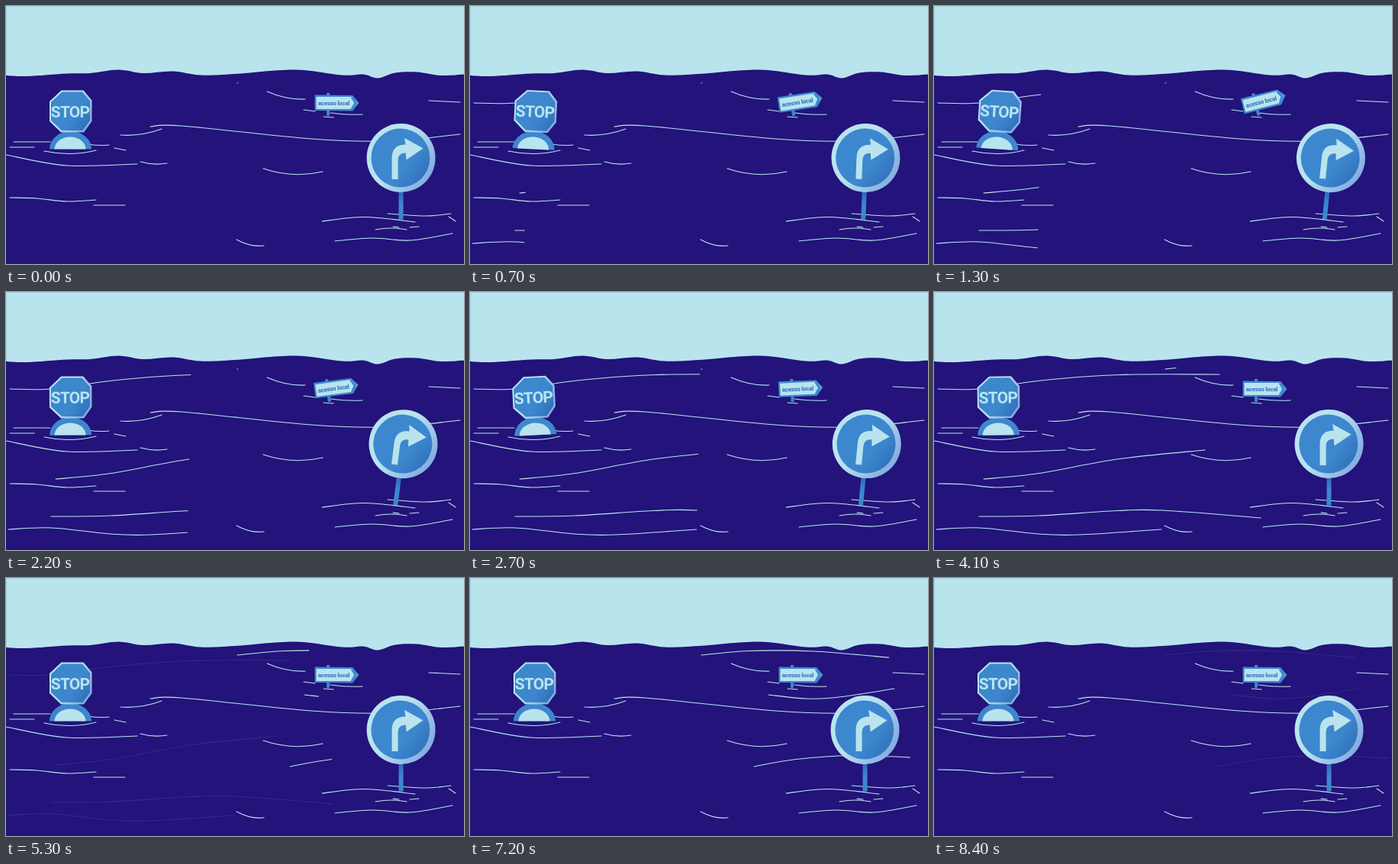
Animation of 600 by 338 pixels, one loop 8800 ms. Source, as an HTML page:

```html
<!DOCTYPE html>
<html lang="pt">
<head>
<meta charset="utf-8">
<title>Signs at sea</title>
<style>
  html, body { margin: 0; width: 100%; height: 100%; overflow: hidden; background: #23137a; }
  svg { display: block; width: 100%; height: 100%; }
  .wave path { fill: none; stroke: #b9e4ee; stroke-width: 1.1; stroke-linecap: round; }
  .pale { fill: #b9e4ee; }
  .blue { fill: #3d87cf; }
  .sea { fill: #23137a; }
  text { font-family: Roboto, "Liberation Sans", sans-serif; font-weight: 700; text-anchor: middle; }
  .stop { font-size: 21px; letter-spacing: -.8px; }
  .local { font-size: 8px; letter-spacing: -.3px; fill: #2f70bd; }
</style>
</head>
<body>
<svg viewBox="0 0 600 338" preserveAspectRatio="none">
  <defs>
    <linearGradient id="rim" x1="0" y1="0" x2="1" y2=".6">
      <stop offset=".5" stop-color="#b9e4ee"/>
      <stop offset="1" stop-color="#86aee2"/>
    </linearGradient>
    <linearGradient id="face" x1="0" y1="0" x2="1" y2=".7">
      <stop offset=".7" stop-color="#3d87cf"/>
      <stop offset="1" stop-color="#3373bd"/>
    </linearGradient>
    <linearGradient id="pole" x1="0" y1="0" x2="0" y2="1">
      <stop offset="0" stop-color="#2d62b0"/>
      <stop offset=".5" stop-color="#3d87cf"/>
    </linearGradient>
    <clipPath id="clipLeft"><polygon id="wipeLeft"/></clipPath>
    <clipPath id="clipRight"><polygon id="wipeRight"/></clipPath>
  </defs>

  <rect class="pale" width="600" height="338"/>
  <path d="M0 .5H600M.5 0V91" stroke="#a3cbd9"/>
  <path id="sea" class="sea"/>
  <g id="swell" class="wave"></g>
  <g id="ripples" class="wave"></g>
  <g id="left" class="wave" clip-path="url(#clipLeft)"></g>
  <g id="right" class="wave" clip-path="url(#clipRight)"></g>

  <g id="stopSign">
    <path class="blue" d="M57 187.5a27.500 23.500 0 0 1 55 0Z"/>
    <path class="pale" d="M63.500 187.500a20.500 16 0 0 1 41 0Z"/>
    <polygon fill="url(#rim)" points="72.500,110.500 101.500,110.500 112.500,123.500 112.500,151 102,165.500 72,165.500 57,151 57,125"/>
    <polygon fill="url(#face)" points="73.500,112.500 100,112.500 110,124.500 110,150 100.500,163 73,163 59,150 59,126"/>
    <text class="stop pale" x="84.100" y="145.700">STOP</text>
  </g>

  <g id="localSign">
    <rect class="blue" x="420" y="114" width="4" height="30"/>
    <path class="blue" d="M404.500 116.500L454 117L462.500 127L454 137.500L404.500 137Z"/>
    <path class="pale" d="M406.500 119H453.500L460.500 127L453.500 135H406.500Z"/>
    <path class="blue" d="M451.500 119.500h3l5.500 7.500l-5.500 8h-3l4.500 -8Z"/>
    <text class="local" x="429.400" y="130.200">acesso local</text>
  </g>

  <g id="turnSign">
    <rect fill="url(#pole)" x="514.500" y="240" width="6" height="39.500"/>
    <circle fill="url(#rim)" cx="517.500" cy="199" r="45"/>
    <circle fill="url(#face)" cx="516.800" cy="199" r="38.500"/>
    <path class="pale" d="M505.500 227V199Q505.500 181.500 523.500 181.500L522 173L546.500 186.500L524.500 201.500L523.500 192.500Q513.500 192.500 513.500 202V227Z"/>
  </g>
</svg>

<script>
const LOOP = 8800, STEP = 100;
const el = id => document.getElementById(id);

// Smooth curve through a flat list x, y, x, y, ...
function curve(flat) {
  const pts = [];
  for (let i = 0; i < flat.length; i += 2) pts.push([flat[i], flat[i + 1]]);
  let d = `M${pts[0]}`;
  for (let i = 0; i < pts.length - 1; i++) {
    const a = pts[i - 1] || pts[i], b = pts[i], c = pts[i + 1], e = pts[i + 2] || c;
    const h1 = b.map((v, k) => v + (c[k] - a[k]) / 6);
    const h2 = c.map((v, k) => v - (e[k] - b[k]) / 6);
    d += `C${h1} ${h2} ${c}`;
  }
  return d;
}

// Short stroke from x, y by dx, dy, sagging in the middle
const arc = ([x, y, dx, dy = 0, sag = 0]) =>
  `M${x} ${y}q${dx / 2} ${dy / 2 + 2 * sag} ${dx} ${dy}`;

function addWaves(id, waves, shape = curve) {
  el(id).innerHTML = waves.map(w => `<path d="${shape(w)}"/>`).join('');
}

el('sea').setAttribute('d', curve([
  0, 91, 28, 92, 80, 88.5, 110, 88, 147, 83.5, 180, 88, 218, 85.5, 255, 90.5,
  300, 89, 378, 83.5, 440, 90.5, 468, 89.5, 487, 94.5, 510, 87.5, 538, 86.5, 570, 91, 600, 89.5
]) + 'V338H0Z');

addWaves('swell', [
  [189, 158, 230, 157, 400, 174, 500, 177, 595, 168],
  [0, 195, 80, 209, 172, 207],
  [5, 251, 40, 252, 80, 256, 118, 254],
  [414, 282, 470, 276.5, 536, 283],
  [500, 272, 550, 275, 583, 272],
  [431, 308, 480, 304, 530, 307, 585, 298]
]);

addWaves('ripples', [
  [342, 112, 50, 10, 3], [554, 124, 41, 2], [150, 169, 54, -8, 3],
  [5, 185, 32], [10, 178, 48], [50, 190, 68, -1, 4], [108, 181, 27, 1, 1],
  [142, 186, 15, 3], [176, 204, 35, 2, 2], [115, 261, 41],
  [337, 213, 78, 4, 5.5], [302, 306, 36, 8, 3],
  [390, 136, 15, 2], [425, 140, 42, 2, 1], [416, 145, 13, 1],
  [484, 293, 41, 0, -2], [507, 289, 8, 1], [529, 290, 12, -1], [580, 276, 9, 6]
], arc);

addWaves('left', [
  [5, 127, 60, 127, 140, 116, 242, 108.5, 374, 108],
  [65, 245, 138, 237.5, 240, 219, 355, 207],
  [59, 294, 137, 293, 239, 286.5, 300, 286, 428, 296],
  [3, 311, 60, 309, 137, 317, 190, 318, 298, 311]
]);

addWaves('right', [
  [303, 101, 365, 95.5, 450, 96, 552, 104.5],
  [391, 153, 440, 158, 480, 156.5, 556, 145],
  [372, 247, 427, 237.5, 500, 232.5, 596, 236]
]);

const linear = u => u;
const sway = u => (1 - Math.cos(Math.PI * u)) / 2;

// Value at time t from a table of [time, value] steps
function at(t, steps, ease = linear) {
  if (t <= steps[0][0]) return steps[0][1];
  for (let i = 1; i < steps.length; i++) {
    const [t0, v0] = steps[i - 1], [t1, v1] = steps[i];
    if (t <= t1) return v0 + (v1 - v0) * ease((t - t0) / (t1 - t0));
  }
  return steps[steps.length - 1][1];
}

const wipes = {
  Left: { lean: -.02, y: 116, steps: [[0, 0], [1300, 140], [2200, 242], [3300, 372], [3800, 434]] },
  Right: { lean: .21, y: 95, steps: [[3900, 303], [5300, 397], [6300, 461], [7200, 547], [7600, 572]] }
};
const fades = {
  left: [[4500, 1], [5400, 0]],
  right: [[7900, 1], [8400, .1]]
};
const turns = {
  localSign: { pivot: '422 130', steps: [[0, 0], [1200, -14.5], [3300, 0]] },
  turnSign: { pivot: '517.5 222', steps: [[0, 0], [1900, 7.6], [4200, 0]] },
  stopSign: { pivot: '84.5 160', steps: [[0, 0], [1100, 4], [3200, -4], [4400, 0]] }
};

function draw(t) {
  for (const [side, { lean, y, steps }] of Object.entries(wipes)) {
    const x = at(t, steps);
    el('wipe' + side).setAttribute('points',
      `-9,0 ${x - y * lean},0 ${x + (338 - y) * lean},338 -9,338`);
  }
  for (const [id, steps] of Object.entries(fades)) el(id).style.opacity = at(t, steps);
  for (const [id, { pivot, steps }] of Object.entries(turns)) {
    el(id).setAttribute('transform', `rotate(${at(t, steps, sway)} ${pivot})`);
  }
}

function tick() {
  draw(Math.floor(performance.now() % LOOP / STEP) * STEP);
  requestAnimationFrame(tick);
}
tick();
</script>
</body>
</html>
```
